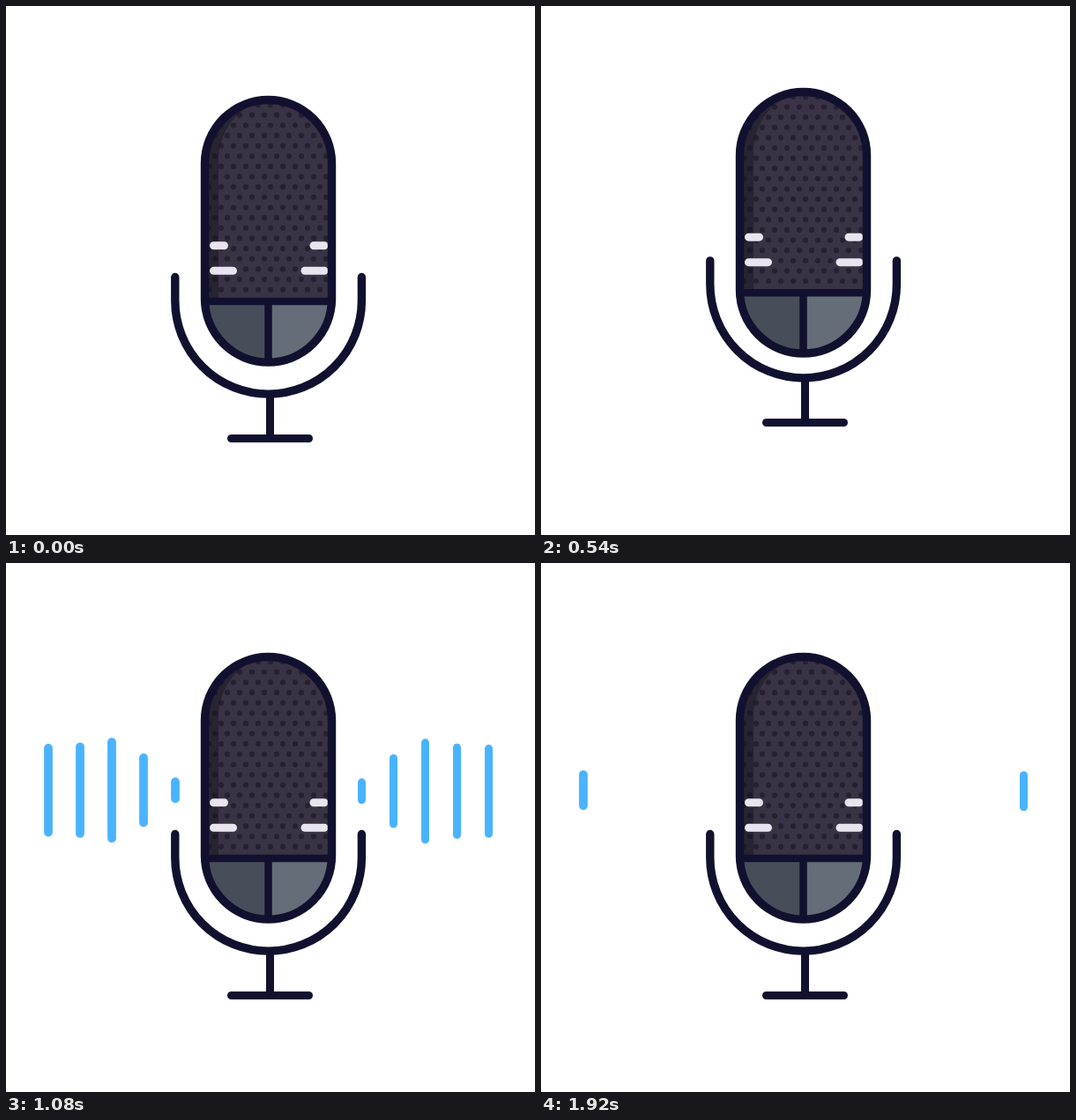
Recreate the animation shown at these times as an HTML page with a canvas. Size 600x600 px, loop 2450 ms.

```html
<!DOCTYPE html>
<html lang="en">
<head>
<meta charset="utf-8">
<title>Microphone</title>
<style>
html, body { margin: 0; width: 100%; height: 100%; overflow: hidden; background: #fff; }
canvas { display: block; width: 600px; height: 600px; }
</style>
</head>
<body>
<canvas id="stage" width="600" height="600"></canvas>
<script>
const ctx = document.getElementById('stage').getContext('2d');
const LOOP = 2450, STEP = 30, LAST = 1920;
const NAVY = '#11112f', BODY = '#393345', DOT = '#262130', SHADE = 'rgba(17, 15, 26, 0.42)';
const MARK = '#e9e5ef', BLUE = '#4ab3ff';
const LINE = 9.4, MID = 297.5, SPLIT = 335;
const HEAD_TOP = 102, HEAD_BOTTOM = 408.6, ARM_TOP = 304, BASE = 490.5;

const ramp = (t, a, b) => Math.min(1, Math.max(0, (t - a) / (b - a)));
const ease = (t, a, b) => { const u = ramp(t, a, b); return u * u * (3 - 2 * u); };
// Eases up from a to b, then back down from c to d.
const swing = (t, a, b, c, d) => ease(t, a, b) - ease(t, c, d);

// A quick hop, with a last part that settles slowly.
const headLift = (t, start, hop, rest) =>
  hop * swing(t, start, 400, 400, 540) + rest * swing(t, start, 400, 540, 1020);
const standLift = (t, start, height) => height * swing(t, start, 340, 340, 757);

// Height of wave bar i, counted outwards from the microphone.
function waveHeight(i, t) {
  const inward = 4 - i;
  const birth = ease(t, 707 + 40 * i, 807 + 40 * i);
  const growth = 0.5 + 0.5 * ramp(t, 900, 1490) ** 2.5;
  const ripple = 0.23 * Math.sin(i * 1.21) * Math.sin(Math.PI * ramp(t, 900, 1490));
  const fall = 1 - ramp(t, 1490, 1980 - 60 * inward) ** (1.2 + 0.8 * inward);
  return (55 + 64 * i) * birth * (growth + ripple) * fall;
}

function line(x1, y1, x2, y2, color, width = LINE, cap = 'round') {
  ctx.strokeStyle = color;
  ctx.lineWidth = width;
  ctx.lineCap = cap;
  ctx.beginPath();
  ctx.moveTo(x1, y1);
  ctx.lineTo(x2, y2);
  ctx.stroke();
}

function rect(color, x, y, w, h) {
  ctx.fillStyle = color;
  ctx.fillRect(x, y, w, h);
}

function pill() {
  ctx.beginPath();
  ctx.arc(MID, HEAD_TOP + 76.5, 72, Math.PI, 0);
  ctx.arc(MID, HEAD_BOTTOM - 76.5, 72, 0, Math.PI);
  ctx.closePath();
}

// Runs a drawing with its top and bottom lifted by different amounts.
function lifted(top, bottom, topLift, bottomLift, draw) {
  const scale = (bottom - bottomLift - top + topLift) / (bottom - top);
  ctx.save();
  ctx.translate(0, top - topLift - top * scale);
  ctx.scale(1, scale);
  draw();
  ctx.restore();
}

function grille() {
  rect(BODY, 222, HEAD_TOP, 152, SPLIT - HEAD_TOP);
  ctx.fillStyle = DOT;
  ctx.beginPath();
  for (let row = 0; row < 19; row++) {
    const y = 112 + row * 11.65;
    for (let x = row % 2 ? 237 : 230; x < 372; x += 14) {
      ctx.moveTo(x + 3.1, y);
      ctx.arc(x, y, 3.1, 0, Math.PI * 2);
    }
  }
  ctx.fill();

  ctx.fillStyle = SHADE;
  ctx.beginPath();
  ctx.moveTo(241, SPLIT);
  ctx.lineTo(241, 176);
  ctx.bezierCurveTo(241, 144, 260, 116, 292, 106);
  ctx.lineTo(222, HEAD_TOP);
  ctx.lineTo(222, SPLIT);
  ctx.fill();
}

function head() {
  ctx.save();
  pill();
  ctx.clip();
  grille();
  rect('#474e5a', 222, SPLIT, 76, 75);
  rect('#656d78', MID, SPLIT, 76, 75);
  ctx.restore();

  for (const [y, length] of [[271.7, 12], [300.3, 22]]) {
    line(235.5, y, 235.5 + length, y, MARK, 9);
    line(361, y, 361 - length, y, MARK, 9);
  }
  line(226, SPLIT, 369, SPLIT, NAVY, 8.5, 'butt');
  line(MID, SPLIT, MID, 403, NAVY, 8.5, 'butt');
  ctx.strokeStyle = NAVY;
  ctx.lineWidth = LINE;
  pill();
  ctx.stroke();
}

function stand() {
  ctx.strokeStyle = NAVY;
  ctx.lineWidth = LINE;
  ctx.lineCap = 'round';
  ctx.beginPath();
  ctx.moveTo(403.4, 307.5);
  ctx.arc(297.6, 334.3, 105.8, 0, Math.PI);
  ctx.lineTo(191.8, 307.5);
  ctx.stroke();
  line(299.5, 440, 299.5, BASE, NAVY, 9, 'butt');
  line(255.5, BASE, 343.5, BASE, NAVY, 9);
}

function bar(x, y, height, width) {
  if (height < 2) return;
  const half = Math.max(0.05, (height - width) / 2);
  line(x, y - half, x, y + half, BLUE, Math.min(width, height));
}

function render(t) {
  rect('#fff', 0, 0, 600, 600);
  lifted(ARM_TOP, BASE, standLift(t, 0, 35), standLift(t, 30, 34), stand);
  lifted(HEAD_TOP, HEAD_BOTTOM, headLift(t, 60, 41, 9), headLift(t, 85, 36, 10), head);
  for (let i = 0; i < 5; i++) {
    const h = waveHeight(i, t);
    bar(192 - 36 * i, 257.7, h, 9.8);
    bar(403.5 + 36 * i, 258.8, h, 9);
  }
}

const start = performance.now();
function tick() {
  const t = (performance.now() - start) % LOOP;
  render(Math.min(LAST, Math.floor(t / STEP) * STEP));
  requestAnimationFrame(tick);
}
tick();
</script>
</body>
</html>
```
